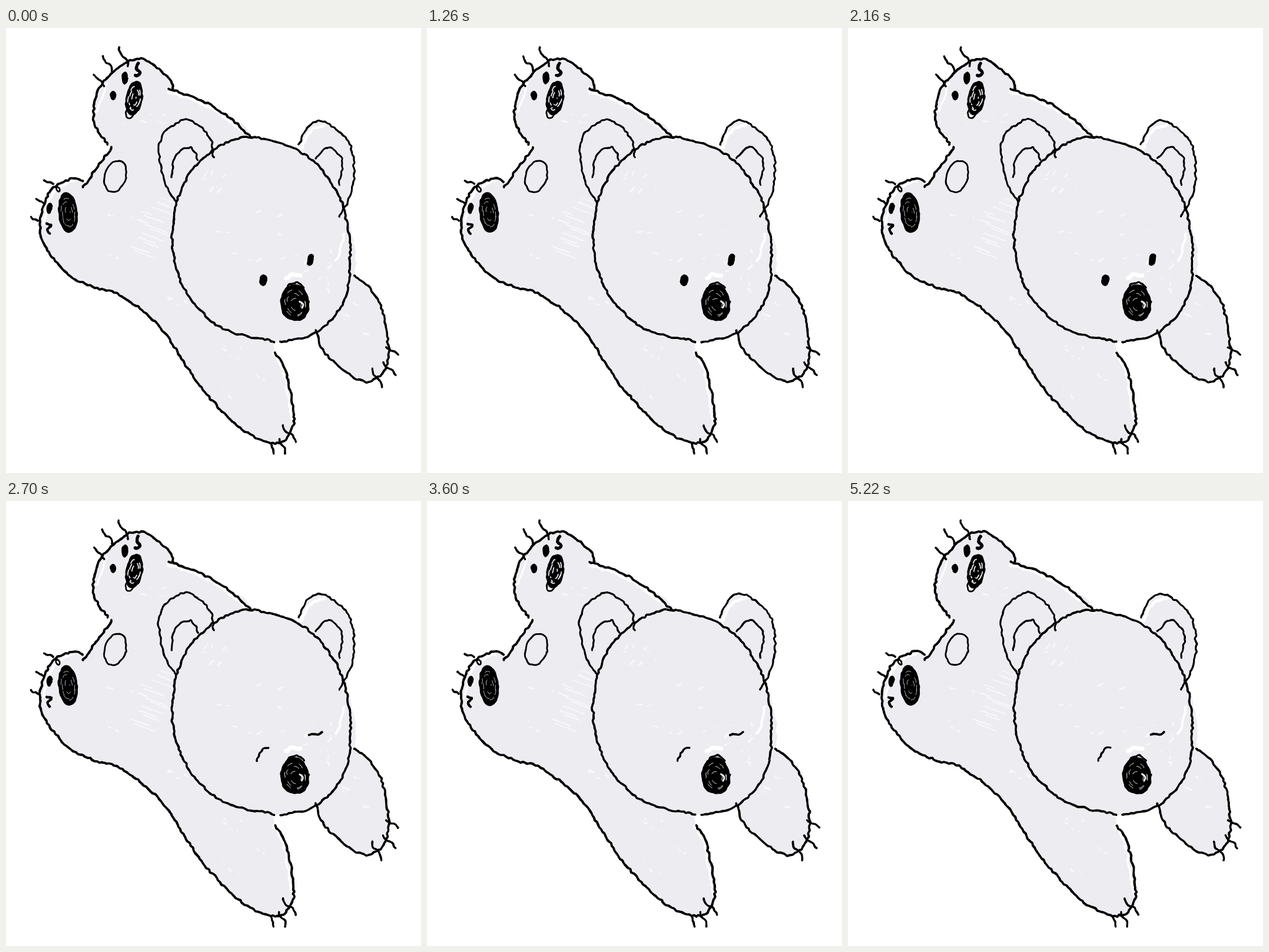
Recreate the animation shown at these times as an HTML page. Size 705 px wide and 757 px high, loop 5.4 s.

```html
<!DOCTYPE html>
<html lang="en">
<head>
<meta charset="utf-8">
<title>Sleepy bear</title>
<style>
html, body { margin: 0; width: 100%; height: 100%; overflow: hidden; background: #fff; }
svg { display: block; width: 100%; height: 100%; }
path { stroke-linecap: round; stroke-linejoin: round; }
</style>
</head>
<body>
<svg id="stage" viewBox="0 0 705 757"></svg>
<script>
const LOOP = 5400, STEP = 180, BLINK = 2700;
const FUR = '#edecf1', INK = '#000', PAPER = '#fff';
const RAD = Math.PI / 180;
const stage = document.getElementById('stage');
const strokes = [];

const parse = text => text.trim().split(/\s+/).map(p => p.split(',').map(Number));

// Repeatable random number from -1 to 1.
function hash(seed, i) {
  const v = Math.sin(seed * 127.1 + i * 311.7) * 43758.5453;
  return (v - Math.floor(v)) * 2 - 1;
}

function noise(seed, x) {
  const i = Math.floor(x), f = x - i, u = f * f * (3 - 2 * f);
  return hash(seed, i) * (1 - u) + hash(seed, i + 1) * u;
}

// Catmull-Rom curve through key points, sampled every 2 px or so, with normals.
function sample(points) {
  const out = [];
  let dist = 0;
  for (let i = 0; i < points.length - 1; i++) {
    const b = points[i], c = points[i + 1];
    const a = points[i - 1] || b, d = points[i + 2] || c;
    const len = Math.hypot(c[0] - b[0], c[1] - b[1]);
    const count = Math.max(1, Math.round(len / 2));
    for (let k = i ? 1 : 0; k <= count; k++) {
      const t = k / count;
      const at = j => 0.5 * (2 * b[j] + (c[j] - a[j]) * t
        + (2 * a[j] - 5 * b[j] + 4 * c[j] - d[j]) * t * t
        + (3 * b[j] - a[j] - 3 * c[j] + d[j]) * t * t * t);
      out.push({ x: at(0), y: at(1), s: dist + t * len });
    }
    dist += len;
  }
  out.forEach((p, i) => {
    const q = out[Math.max(0, i - 1)], r = out[Math.min(out.length - 1, i + 1)];
    const len = Math.hypot(r.x - q.x, r.y - q.y) || 1;
    p.nx = (q.y - r.y) / len;
    p.ny = (r.x - q.x) / len;
  });
  return out;
}

// Hand tremor plus a fresh wobble on every step; grain varies the line weight.
function outline({ points, seed, rough }, step, grain) {
  return points.map((p, i) => {
    const n = rough * (1.4 * noise(seed, p.s / 4.5)
      + 0.7 * noise(seed + 50 + step * 7, p.s / 10)
      + grain * noise(seed + 90 + step, p.s / 5));
    return (i ? 'L' : 'M') + (p.x + p.nx * n).toFixed(1) + ' ' + (p.y + p.ny * n).toFixed(1);
  }).join('');
}

function add(points, { width = 3, color = INK, fill = 'none', rough = 1, opacity = 1, dash = 'none', eyes = '' } = {}) {
  const node = document.createElementNS('http://www.w3.org/2000/svg', 'path');
  const attrs = { fill, stroke: color, 'stroke-width': width, 'stroke-dasharray': dash, opacity };
  for (const name in attrs) node.setAttribute(name, attrs[name]);
  stage.append(node);
  strokes.push({
    node, points: sample(points), seed: strokes.length + 1, rough, eyes,
    twice: color === INK && fill === 'none'
  });
}

const line = (text, options) => add(parse(text), options);
const fur = points => add(points, { fill: FUR, color: FUR, width: 1, rough: 0.6 });
const shift = (points, dx, dy) => points.map(([x, y]) => [x + dx, y + dy]);

// White gap where the fill stops short of a contour.
const rim = (points, dx, dy, width) => add(shift(points, dx, dy), { color: PAPER, width });

// Fill that runs over a contour.
const spill = (points, dx, dy) => add(shift(points, dx, dy), { color: FUR, width: 8 });

// Scattered dry-brush marks inside an ellipse.
function flecks(cx, cy, rx, ry, count, slope) {
  for (let i = 0; i < count; i++) {
    const r = Math.sqrt(Math.abs(hash(cx, i))), a = Math.PI * hash(cy, i);
    const x = cx + rx * r * Math.cos(a), y = cy + ry * r * Math.sin(a);
    const len = 5 + 4 * hash(rx, i), dir = (slope + 30 * hash(ry, i)) * RAD;
    add([[x, y], [x + len * Math.cos(dir), y + len * Math.sin(dir)]],
      { color: PAPER, width: 2.5 + 1.5 * hash(cx, i + 99), opacity: 0.55, rough: 0.5 });
  }
}

// Elliptical spiral: one full turn, then winding inwards.
function scribble(cx, cy, rx, ry, tilt, turns, inner, options) {
  const total = turns * 12, c = Math.cos(tilt * RAD), s = Math.sin(tilt * RAD), points = [];
  for (let i = 0; i <= total; i++) {
    const wound = Math.max(0, i - 12) / Math.max(1, total - 12);
    const k = 1 - (1 - inner) * wound + 0.04 * hash(cx, i % total);
    const x = rx * k * Math.cos(i * 30 * RAD), y = ry * k * Math.sin(i * 30 * RAD);
    points.push([cx + x * c - y * s, cy + x * s + y * c]);
  }
  add(points, { rough: 0.6, ...options });
}

const dot = (cx, cy, rx, ry, tilt, eyes) =>
  scribble(cx, cy, rx, ry, tilt, 1, 1, { fill: INK, width: 3, eyes });

// Dense black scribble with broken light lines showing through.
function pad(cx, cy, rx, ry, tilt, light) {
  scribble(cx, cy, rx, ry, tilt, 1, 1, { fill: INK, width: 3.5 });
  scribble(cx, cy, rx * 0.75, ry * 0.75, tilt, 3, 0.3, { color: FUR, width: light, dash: '9 12' });
}

// A row of curved claws; each next one turns and grows a little.
function claws(tips, dir, turn, len, grow) {
  parse(tips).forEach(([x, y], i) => {
    const a = (dir + turn * i) * RAD, size = len + grow * i;
    add([0, 1, 2, 3].map(k => {
      const t = k / 3 * size, bend = 0.08 * size * Math.sin(k * 120 * RAD);
      return [x + t * Math.cos(a) - bend * Math.sin(a), y + t * Math.sin(a) + bend * Math.cos(a)];
    }), { width: 3.2 });
  });
}

const upperFoot = parse('173,198 153,168 149,140 166,91 222,52 276,83 284,103');
const back = parse('276,104 325,120 372,147 418,186');
const leg = parse('180,203 150,244 131,271');
const belly = parse(`130,262 110,257 75,278 58,330 68,373 106,419 150,441 195,455
  262,509 330,609 400,682 462,706 489,670 475,585 457,552`);
const head = parse(`456,533 367,510 305,447 282,362 300,268 355,206 420,186
  510,217 567,290 585,380 574,465 525,519 466,534`);
const leftEar = parse('353,220 345,184 306,156 268,180 260,215 273,272 290,295');
const rightEar = parse('497,198 512,169 538,158 583,196 591,250 584,288 566,321');
const rightArm = parse('526,514 541,552 598,598 635,593 650,550 634,465 592,421');

// Fur
fur([...upperFoot, ...back, [430, 300], [450, 500], ...[...belly].reverse(), ...[...leg].reverse()]);
[leftEar, rightEar, rightArm].forEach(fur);
spill(head.slice(8, 11), 5, 12);
fur(head);

// Dry brush
rim(back, -1, 5, 4);
rim(upperFoot.slice(2, 4), 5, 3, 3);
rim(belly.slice(1, 4), 5, 3, 4);
rim(rightEar.slice(0, 3), 5, 7, 5);
rim(belly.slice(12), -4, 0, 3);
flecks(235, 160, 45, 20, 7, 10);
flecks(170, 350, 70, 50, 8, 40);
flecks(290, 465, 25, 10, 5, 30);
flecks(395, 585, 55, 50, 12, 45);
flecks(595, 515, 30, 50, 6, 30);
flecks(350, 265, 45, 22, 9, -40);
flecks(430, 370, 100, 70, 14, -10);
flecks(545, 400, 22, 50, 9, 115);
line('476,426 485,420 500,421', { color: PAPER, width: 7 });
line('574,350 570,372 561,396', { color: PAPER, width: 4 });
for (let i = 0; i < 13; i++) {
  const x = 252 - i * 3 + 14 * hash(4, i), y = 289 + i * 7.5, len = 27 + 13 * hash(5, i);
  add([[x, y], [x + len, y + len * 0.37]],
    { color: PAPER, width: 1.5 + Math.abs(hash(6, i)), opacity: 0.6, rough: 0.5 });
}

// Contours
[upperFoot, back, leg, belly].forEach(p => add(p, { width: 3.6 }));
[head, rightArm].forEach(p => add(p, { width: 3.4 }));
[leftEar, rightEar].forEach(p => add(p, { width: 2.9 }));
line('281,254 288,217 313,203 327,224', { width: 2.8 });
line('526,222 548,202 571,226 566,267', { width: 2.8 });
scribble(186, 252, 18, 27, 17, 1, 1, { width: 2.7 });

// Paws
claws('191,33 164,48 150,79', 63, -6, 36, -5);
claws('64,260 51,291 43,321', 20, 8, 17, -2);
claws('454,724 475,724 493,704', -98, -15, 18, 9);
claws('666,556 661,591 639,611', -146, 14, 24, 6);
pad(218, 119, 13, 28, 9, 1.8);
scribble(211, 143, 7, 12, 20, 1, 1, { width: 2.5 });
pad(105, 314, 15, 33, -5, 0.8);
dot(182, 114, 4, 6.5, 0);
dot(202, 85, 4, 10, 5);
line('225,60 223,69 227,76 220,81', { width: 5 });
dot(74, 307, 3, 8, 8);
scribble(88, 274, 3, 5, -20, 1, 1, { width: 2.5 });
line('69,333 76,335 70,342 74,350', { width: 4 });

// Face
pad(491, 468, 23, 30, -6, 1);
line('479,441 485,434 499,434 506,442');
line('500,464 506,470 503,476', { color: FUR });
dot(437, 429, 5.5, 8, 0, 'open');
dot(517, 394, 4.5, 9, 12, 'open');
line('425,442 430,431 438,420 446,419', { eyes: 'closed' });
line('515,399 524,396 530,397 537,393', { width: 3.5, eyes: 'closed' });

let shownStep = -1;
function draw(time) {
  const t = time % LOOP, step = Math.floor(t / STEP);
  if (step === shownStep) return;
  shownStep = step;
  const eyes = t < BLINK ? 'open' : 'closed';
  for (const stroke of strokes) {
    stroke.node.style.display = stroke.eyes && stroke.eyes !== eyes ? 'none' : '';
    const d = outline(stroke, step, 0);
    stroke.node.setAttribute('d', stroke.twice ? d + outline(stroke, step, 0.8) : d);
  }
}

const start = performance.now();
function tick() {
  draw(performance.now() - start);
  requestAnimationFrame(tick);
}
tick();
</script>
</body>
</html>
```
